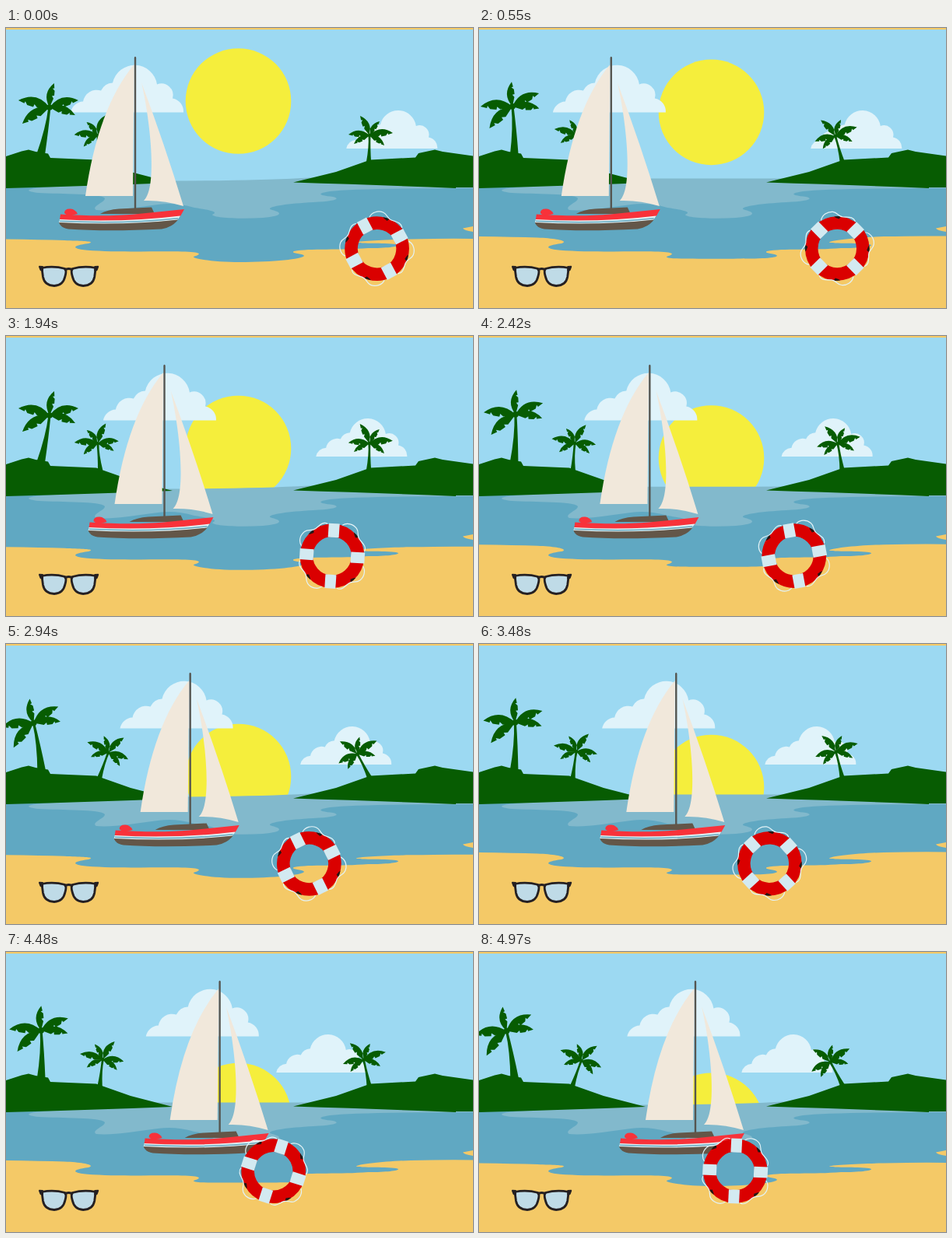
Animation of 600x360 px, one loop 5000 ms. Source, as an HTML page:

```html
<!DOCTYPE html>
<html lang="en">
<head>
<meta charset="utf-8">
<title>Beach</title>
<style>
  html, body { margin: 0; width: 100%; height: 100%; overflow: hidden; background: #9cd9f2; }
  svg { display: block; width: 600px; height: 360px; }
</style>
</head>
<body>
<svg viewBox="0 0 600 360" xmlns="http://www.w3.org/2000/svg">
  <defs>
    <path id="cloud" fill="#e0f3fa" d="M0 0A17 17 0 0 1 16 -14A18 18 0 0 1 39 -28A18 18 0 0 1 54 -38A29 29 0 0 1 111 -36A15 15 0 0 1 131 -18A17 17 0 0 1 145 0Z"/>
    <g id="quarter">
      <path d="M-7 -41.8H7V-24H-7Z" fill="#d3eaf1"/>
      <g transform="rotate(45)">
        <path d="M-4.500 -41Q0 -42 4.500 -41L2 -38L-2 -39.500Z" fill="#241714"/>
        <path d="M-21 -36C-20 -43 -13 -47.500 -6 -47C0 -46.500 1 -41 7 -40.500C13 -40 20 -42 23 -35" fill="none" stroke="#e3f3f7" stroke-width="1.200"/>
      </g>
    </g>
    <g id="lens" stroke="#252022" stroke-linejoin="round">
      <path d="M46 308.500Q61 305.500 76 309.500Q78 312 76 319Q73.500 331 62 331.500Q49.500 331 47.500 320Z" fill="#bfdbe7" stroke-width="2.800"/>
      <path d="M43 306.800L47 307V312L44.500 311Z" fill="#252022" stroke-width="2"/>
    </g>
  </defs>

  <rect width="600" height="360" fill="#9cd9f2"/>
  <circle id="sun" cx="298.5" cy="94" r="67.8" fill="#f5ee3c"/>
  <use id="cloudL" href="#cloud"/>
  <use id="cloudR" href="#cloud"/>

  <path d="M0 200H600V360H0Z" fill="#60a8c2"/>
  <path id="shallows" fill="#82b9cc"/>

  <g id="palms" fill="#075c02"></g>
  <g fill="#075c02">
    <path d="M0 165L20 158.500L29 156.500L38 159L54 161.500L57 167L116 169.500L160 185L214 199Q110 203 0 206Z"/>
    <path d="M369 198.500L424 185L468 169.500L526 166.500L530 161L551 156.500L561 159L600 164.500V205H578V206Q480 202 369 198.500Z"/>
  </g>

  <path id="sand" fill="#f4c967"/>
  <path d="M600 255L587 257.500Q588 260 600 262Z" fill="#f4c967"/>
  <rect width="600" height="2" fill="#f4c967"/>

  <g id="boat">
    <path d="M164.500 47Q118 103 102 216H163Z" fill="#f1e8db"/>
    <path d="M174 70C184 112 196 205 177 222Q202 221 228 229Q204 150 174 70Z" fill="#f1e8db"/>
    <path d="M164.800 38Q166 35.500 167.200 38V232H164.800Z" fill="#555550"/>
    <path d="M121 239Q130 233.500 145 232.500L187 230.500L191 239Z" fill="#635648"/>
    <path d="M75 238Q75 232 83 232.500Q89 233 92 239L80 242Z" fill="#f8323a"/>
    <path d="M70 239.500Q125 243 165 239.500L229 233L224 242Q150 251 69 246.500Z" fill="#f8323a"/>
    <path d="M69 246Q150 250.500 224 241.500L220 247Q150 255 68 250.500Z" fill="#e4f1f3"/>
    <path d="M69 248.300Q150 252.500 221 244.800" fill="none" stroke="#64a9c1" stroke-width="1.500"/>
    <path d="M68 250Q150 254.500 221 246.500Q214 256 200 258.500Q130 262 80 258.500Q70 257 68 250Z" fill="#635648"/>
  </g>

  <g id="ring">
    <circle r="33" fill="none" stroke="#da0000" stroke-width="16.500"/>
    <use href="#quarter"/>
    <use href="#quarter" transform="rotate(90)"/>
    <use href="#quarter" transform="rotate(180)"/>
    <use href="#quarter" transform="rotate(270)"/>
  </g>

  <use href="#lens"/>
  <use href="#lens" transform="translate(161.200 0) scale(-1 1)"/>
  <path d="M75 311.500Q80.600 307.500 86 311.500" fill="none" stroke="#252022" stroke-width="3"/>
</svg>
<script>
const LOOP = 5000;
const SWAY = 1000;
const byId = id => document.getElementById(id);
const move = (el, value) => el.setAttribute('transform', value);
const ease = p => p * p * (3 - 2 * p);

// Frond from the crown at 0,0 to its tip: smooth back, notched underside.
function frond([x, y]) {
  const side = x < 0 ? -1 : 1;
  const at = (along, out) =>
    `${(x * along + side * y * out).toFixed(2)} ${(y * along - side * x * out).toFixed(2)}`;
  return `M0 0Q${at(.5, .42)} ${at(1, 0)}L${at(.8, -.05)} ${at(.78, .02)} ${at(.7, -.08)}` +
    `L${at(.5, -.1)} ${at(.48, -.01)} ${at(.38, -.09)}Z`;
}

const small = {
  crown: [1, -32], foot: 3.2,
  tips: [[-12, -25], [13, -18], [30, -3], [19, 13], [-27, -1], [-20, 11]]
};
const big = {
  crown: [11.5, -58], foot: 5.5,
  tips: [[6, -31], [37, -9], [33, 10], [-40, -9], [-35, 21]]
};

function addPalm(kind, x, y, flip, from, to, lead) {
  const [cx, cy] = kind.crown;
  const g = document.createElementNS('http://www.w3.org/2000/svg', 'g');
  g.innerHTML =
    `<path d="M${-kind.foot} 3Q${cx * .6} ${cy * .55} ${cx - 1.5} ${cy}h3Q${cx * .8 + 1} ${cy * .5} ${kind.foot} 3Z"/>` +
    `<g transform="translate(${cx} ${cy})"><circle r="${kind.foot * .7}"/>` +
    `<path d="${kind.tips.map(frond).join('')}"/></g>`;
  byId('palms').append(g);
  return { g, x, y, flip, from, to, lead };
}

const palms = [
  addPalm(big, 44.5, 160, 1, 0, -20, 40),
  addPalm(small, 121, 170, -1, 4, -21, 0),
  addPalm(small, 466, 170, 1, 0, -29, 0)
];

// 0 at even seconds, 1 at odd seconds, eased between.
function sway(t) {
  const n = Math.floor(t / SWAY);
  const p = ease(t / SWAY - n);
  return n % 2 ? 1 - p : p;
}

function shallows(w) {
  const left = 196.5 - 3 * w, right = 192.5 + w;
  return `M180 ${left}Q310 ${left + .5 - w / 2} 390 ${right}L600 200V206Q450 206 416 210` +
    'C398 213 402 215 420 217C432 220 420 223 395 224C355 226 330 231 342 234' +
    'C358 238 352 242 330 244C300 246 266 244 265 240C274 236 262 234 242 231' +
    'C225 226 210 225 195 227C165 231 135 236 116 234C108 230 128 224 127 219' +
    'C122 212 70 214 42 212C24 210 24 207 48 205Z';
}

function shore(w) {
  const edge = 271.5 - 3.5 * w, low = 301 - 4.5 * w;
  return `M0 ${edge}Q45 ${edge + .5} 75 ${edge + 1.5}C100 ${edge + 2.5} 116 274 106 277` +
    `C84 280 86 283 98 285C140 290 225 285 243 288.500C252 290 247 292 241 294` +
    `C240 297 270 ${low} 300 ${low}C345 ${low} 380 297 383 293` +
    `C383 290 364 290 370 287C390 283 430 286 465 283C490 283 505 281 504 279` +
    `C500 276 458 278 450 275.800C449 ${274 - w} 490 ${edge + .5} 520 ${edge}` +
    `Q565 ${edge - 1} 600 ${edge - .5}V360H0Z`;
}

function draw(t) {
  const p = t / LOOP;
  byId('sun').setAttribute('cy', 94 + 130 * p);
  move(byId('cloudL'), `translate(${83 + 108 * p} 108.500)`);
  move(byId('cloudR'), `translate(${437.3 - 100.5 * p} 155) scale(.807)`);
  move(byId('boat'), `translate(${112 * ease(p)} 0)`);
  move(byId('ring'), `translate(${476.6 - 148.3 * p} ${283.7 - 2.2 * p}) rotate(${62 - 150 * p})`);
  for (const { g, x, y, flip, from, to, lead } of palms) {
    const turn = from + (to - from) * sway(Math.min(t + lead, LOOP));
    move(g, `translate(${x} ${y}) scale(${flip} 1) rotate(${turn})`);
  }
  const wave = ease(1 - Math.abs((t % SWAY) / (SWAY / 2) - 1));
  byId('shallows').setAttribute('d', shallows(wave));
  byId('sand').setAttribute('d', shore(wave));
}

function tick() {
  draw(performance.now() % LOOP);
  requestAnimationFrame(tick);
}
tick();
</script>
</body>
</html>
```
